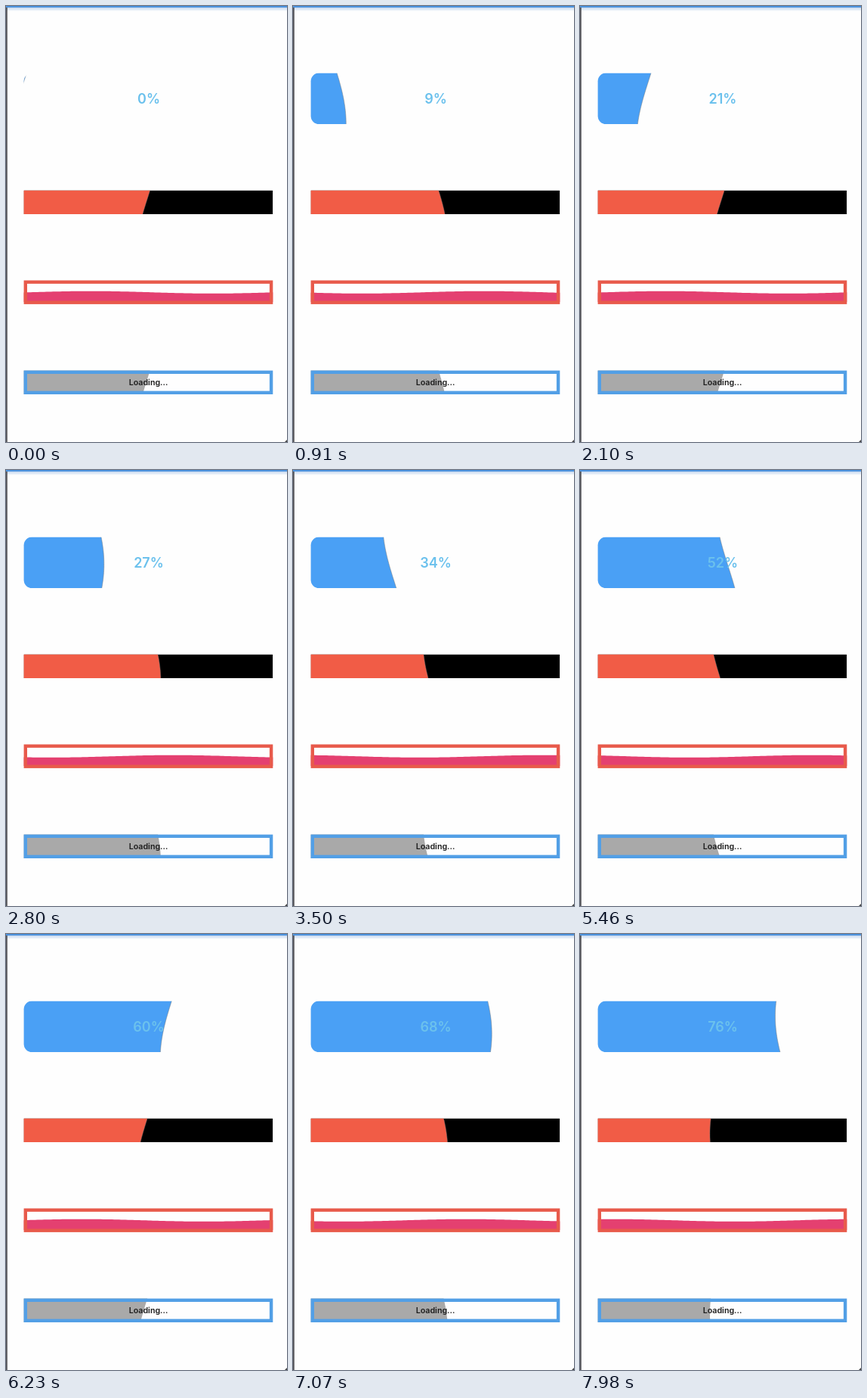
These frames come from a looping animation (372 px wide and 576 px high, 8 s). An HTML page:

```html
<!DOCTYPE html>
<html lang="en">
<head>
<meta charset="utf-8">
<title>Liquid progress bars</title>
<style>
  html, body { margin: 0; width: 100%; height: 100%; overflow: hidden; background: #fefefe; }
  svg { display: block; width: 100vw; height: 100vh; }
  text { font-family: Inter, Roboto, sans-serif; font-weight: 600; text-anchor: middle; }
  .edge { fill: none; stroke: #777; stroke-opacity: .6; stroke-width: .8; }
</style>
</head>
<body>
<svg viewBox="0 0 372 576">
  <defs>
    <linearGradient id="shadow" x2="0" y2="1">
      <stop offset="0" stop-color="#c3d6ee"/>
      <stop offset="1" stop-color="#fefefe"/>
    </linearGradient>
    <clipPath id="roundClip"><rect x="23.6" y="88.5" width="329.7" height="67.6" rx="10.8"/></clipPath>
    <clipPath id="solidClip"><rect x="23.6" y="243.6" width="329.7" height="31.5"/></clipPath>
  </defs>

  <rect width="372" height="576" fill="#fefefe"/>
  <rect y="2" width="372" height="5" fill="url(#shadow)"/>
  <rect width="372" height="2" fill="#4d93de"/>
  <rect y="2" width="1.8" height="574" fill="#55555a"/>
  <path d="M372 573v3h-3z" fill="#444"/>

  <g clip-path="url(#roundClip)">
    <path id="roundFill" fill="#4aa0f5"/>
    <path id="roundEdge" class="edge"/>
  </g>
  <text id="percent" x="189" y="129" font-size="18" fill="#6bc1ed"></text>

  <g clip-path="url(#solidClip)">
    <rect x="23.6" y="243.6" width="329.7" height="31.5"/>
    <path id="solidFill" fill="#f15c46"/>
    <path id="solidEdge" class="edge"/>
  </g>

  <path id="pinkFill" fill="#e44070"/>
  <rect x="25.8" y="364.7" width="325.3" height="27" fill="none" stroke="#e85a4b" stroke-width="4.4"/>

  <path id="greyFill" fill="#a9a9a9"/>
  <rect x="25.8" y="483.8" width="325.3" height="27" fill="none" stroke="#529fe6" stroke-width="4.4"/>
  <text x="188.5" y="501" font-size="10.7" fill="#1c1c1c">Loading...</text>
</svg>
<script>
  const LOOP = 8000, STEP = 70;
  const LEFT = 23.6, WIDTH = 329.7, UNIT = 0.9;
  const $ = id => document.getElementById(id);
  const setPath = (id, d) => $(id).setAttribute('d', d);

  // One degree of wave per layout unit, amplitude 1/20 of the bar's extent.
  const wave = (phase, offset) => Math.sin((phase - offset / UNIT) * Math.PI / 180) / 20;

  function sample(length, point) {
    const count = Math.ceil(length / 3), points = [];
    for (let i = 0; i <= count; i++) {
      points.push(point(i * length / count).map(n => n.toFixed(2)).join(' '));
    }
    return 'M' + points.join('L');
  }

  const sideEdge = (top, height, level, phase) =>
    sample(height, y => [LEFT + WIDTH * (level + wave(phase, y)), top + y]);

  const surface = (top, height, level, phase) =>
    sample(WIDTH, x => [LEFT + x, top + height * (1 - level + wave(phase, x))]);

  const closeLeft = (edge, top, height) => `${edge}L${LEFT - 20} ${top + height}V${top}Z`;

  function draw(ms) {
    const t = Math.floor(ms / STEP) * STEP / 1000;
    const value = 0.43 + 9.6 * t - 0.0125 * t * t;
    const phase = value * 18;

    const round = sideEdge(88.5, 67.6, value / 100, phase);
    setPath('roundFill', closeLeft(round, 88.5, 67.6));
    setPath('roundEdge', round);
    $('percent').textContent = value.toFixed(0) + '%';

    const solid = sideEdge(243.6, 31.5, 0.5, phase);
    setPath('solidFill', closeLeft(solid, 243.6, 31.5));
    setPath('solidEdge', solid);

    setPath('pinkFill', `${surface(362.5, 31.5, 0.5, phase)}V391H${LEFT}Z`);

    const grey = sideEdge(481.6, 31.5, 0.5, phase);
    setPath('greyFill', `${grey}H${LEFT}V481.6Z`);
  }

  const start = performance.now();
  function tick() {
    draw((performance.now() - start) % LOOP);
    requestAnimationFrame(tick);
  }
  tick();
</script>
</body>
</html>
```
